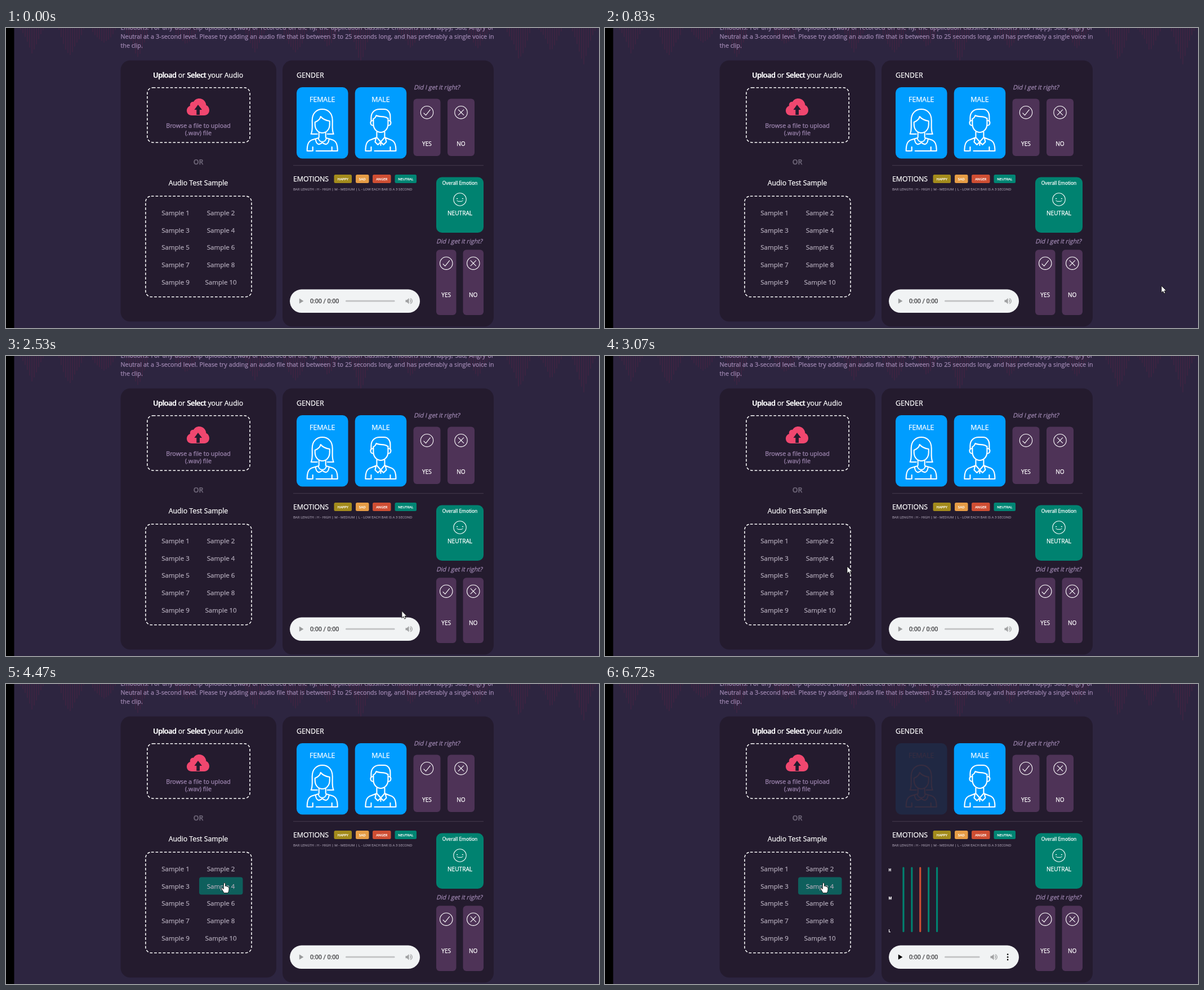
Animation, 1053 px wide and 532 px high, one loop 8 s. Source, as an HTML page with a canvas:

```html
<!DOCTYPE html>
<html lang="en">
<head>
<meta charset="utf-8">
<title>Audio emotion panel</title>
<style>
html, body { margin: 0; width: 100%; height: 100%; overflow: hidden; background: #2d2540; }
canvas { display: block; }
</style>
</head>
<body>
<canvas id="stage" width="1053" height="532"></canvas>
<script>
const W = 1053, H = 532, LOOP = 8000;
const LOADING = 4550, RESULT = 6720;
const PANEL = '#241b2e', PURPLE = '#4e3357', TEAL = '#008270', RED = '#cf4e33', LILAC = '#a189b3';
const SANS = '"Open Sans", sans-serif';

const stage = document.getElementById('stage').getContext('2d');
const layer = document.createElement('canvas');
layer.width = W;
layer.height = H;
const g = layer.getContext('2d');

const ICONS = {
  female: 'M-9 46H-20C-17 41 -18 33 -18 22C-18 9 -10 2 0 2C10 2 18 9 18 22C18 33 17 41 20 46H9' +
    'M-13 25C-8 23 -4 20 -3 15C1 20 7 22 13 23M-13 25V29C-13 38 -7 44 0 44S13 38 13 29V23' +
    'M-6 43V52M6 43V52M-19 76H-27C-27 63 -24 58 -17 56L-7 53C-6 62 6 62 7 53L17 56C24 58 27 63 27 76H-11' +
    'M-12 55C-11 64 -6 67 0 61C6 67 11 64 12 55M-17 76V69M17 76V69',
  male: 'M-17 24V17C-17 7 -10 2 -2 2H6C13 2 17 8 17 15V24M-13 24V19C-10 18 -9 16 -8 13C-1 17 6 13 12 18' +
    'M-13 20V28C-13 38 -6 43 0 43S13 38 13 28V18M-14 22C-20 22 -19 31 -13 31M14 22C20 22 19 31 13 31' +
    'M-7 42V52M7 42V52M-19 76H-27C-27 63 -24 58 -17 56L-7 52L0 60L7 52L17 56C24 58 27 63 27 76H-11' +
    'M-8 52L-10 60L-5 65L0 60L5 65L10 60L8 52M0 61V66M-17 76V69M17 76V69',
  cloud: 'M330 155C324 155 321 151 321 146.5C321 142 324 139 327 138C326 133 330 130 333 131' +
    'C335 127 339 125 343 125C350 125 355 130 355.5 137C359 138 361 142 361 146C361 151 357 155 352 155Z',
  upload: 'M341 136L348 145H344V154H338.3V145H334.5Z',
  arrow: 'M0 0V12.5L2.9 9.8L4.8 14L7 13L5.1 9H8.8Z',
  hand: 'M-1.5 1.2Q0 -1 1.5 1.2V6Q3 5 4 6.6Q6 6 6.4 7.6Q8 7.4 8 9.4V12Q8 15 6 18H-1Q-3 14 -5 11.4Q-5.6 9 -3.6 9.2L-1.5 11Z',
  speaker: 'M-6 -2H-3.5L0 -5.2V5.2L-3.5 2H-6Z'
};
for (const k in ICONS) ICONS[k] = new Path2D(ICONS[k]);

function box(x, y, x2, y2, r, color) {
  g.beginPath();
  g.roundRect(x, y, x2 - x, y2 - y, r);
  g.fillStyle = color;
  g.fill();
}

// y is the middle of the capitals; a hairline stroke gives the heavier screen weight
function text(s, x, y, size, color = '#fff', align = 'center', style = '', family = SANS) {
  g.font = `${style} ${size}px ${family}`;
  g.textAlign = align;
  g.fillStyle = g.strokeStyle = color;
  g.lineWidth = 0.25;
  g.fillText(s, x, y + size * 0.357);
  g.strokeText(s, x, y + size * 0.357);
}

function question(x, y) {
  g.save();
  g.transform(1, 0, -0.25, 1, x, y + 3.85);
  text('Did I get it right?', 0, -3.85, 10.78, LILAC, 'left');
  g.restore();
}

function justify(s, x, x2, y, size) {
  const words = s.split(' ');
  g.font = `${size}px ${SANS}`;
  const widths = words.map(w => g.measureText(w).width);
  const gap = (x2 - x - widths.reduce((a, b) => a + b)) / (words.length - 1);
  words.forEach((w, i) => {
    text(w, x, y, size, LILAC, 'left');
    x += widths[i] + gap;
  });
}

function dashed(x, y, x2, y2) {
  g.beginPath();
  g.roundRect(x, y, x2 - x, y2 - y, 10);
  g.setLineDash([4.62, 3.08]);
  g.strokeStyle = '#fff';
  g.lineWidth = 1.54;
  g.stroke();
  g.setLineDash([]);
}

function line(color, width, ...pts) {
  g.beginPath();
  for (let i = 0; i < pts.length; i += 2) g.lineTo(pts[i], pts[i + 1]);
  g.strokeStyle = color;
  g.lineWidth = width;
  g.stroke();
}

function ring(x, y, r) {
  g.beginPath();
  g.arc(x, y, r, 0, 7);
  g.strokeStyle = '#fff';
  g.lineWidth = 1.1;
  g.stroke();
}

function vote(x, x2, y, y2, iconY, textY, yes) {
  const cx = (x + x2) / 2;
  box(x, y, x2, y2, 6, PURPLE);
  ring(cx, iconY, 11.2);
  if (yes) {
    line('#fff', 1.1, cx - 6, iconY + 1, cx - 2, iconY + 5, cx + 6, iconY - 5);
  } else {
    line('#fff', 1.1, cx - 5, iconY - 5, cx + 5, iconY + 5);
    line('#fff', 1.1, cx + 5, iconY - 5, cx - 5, iconY + 5);
  }
  text(yes ? 'YES' : 'NO', cx, textY, 10.1);
}

function person(x, label, icon, off) {
  const ink = off ? '#372d40' : '#fff';
  box(x, 105, x + 91.5, 231.5, 10, off ? '#202843' : '#009dff');
  text(label, x + 45.7, 126.5, 12.32, ink);
  g.save();
  g.translate(x + 45.7, 142);
  g.strokeStyle = ink;
  g.lineWidth = 2.1;
  g.lineCap = g.lineJoin = 'round';
  g.stroke(icon);
  g.restore();
}

function chip(x, x2, label, color) {
  box(x, 260, x2, 275, 2.5, color);
  text(label, (x + x2) / 2, 267.7, 6.16);
}

function uploadPanel(hover) {
  box(203.5, 57.5, 480, 520.5, 17, PANEL);
  let x = 261;
  for (const w of ['Upload', 'or', 'Select', 'your', 'Audio']) {
    text(w, x, 83.6, 12.32, '#fff', 'left');
    if (w === 'Upload' || w === 'Select') text(w, x + 0.7, 83.6, 12.32, '#fff', 'left');
    x += g.measureText(w + ' ').width;
  }
  dashed(250.9, 105.7, 433.1, 203);
  g.fillStyle = '#f0476f';
  g.fill(ICONS.cloud);
  g.fillStyle = PANEL;
  g.fill(ICONS.upload);
  text('Browse a file to upload', 341.5, 173.5, 10.78, LILAC);
  text('(.wav) file', 341.5, 186, 10.78, LILAC);
  text('OR', 341.5, 238, 12.32, '#6f6779', 'center', '600');
  text('Audio Test Sample', 341.5, 274.6, 12.32);
  dashed(247.9, 298.3, 436, 476.7);
  g.globalAlpha = hover;
  box(343, 342.5, 420.5, 373.5, 4, '#0e5f5c');
  g.globalAlpha = 1;
  for (let i = 0; i < 10; i++) {
    text('Sample ' + (i + 1), i % 2 ? 381.5 : 301, 327.6 + 30.8 * (i >> 1), 11.55, '#b3abba');
  }
}

function player(loaded, result) {
  box(504, 463.6, 735, 505, 20.7, '#f1f3f4');
  g.fillStyle = loaded ? '#000' : '#9a9b9c';
  g.beginPath();
  g.moveTo(520.8, 479.6);
  g.lineTo(528.4, 484.2);
  g.lineTo(520.8, 488.8);
  g.fill();
  text('0:00 / 0:00', 540, 484.2, 10.78, '#3b3b3d', 'left', '', 'Roboto, sans-serif');
  box(603, 482.7, result ? 665.5 : 690.5, 485.6, 1.5, '#c1c2c4');
  g.save();
  g.translate(result ? 690.5 : 715.5, 484.2);
  g.fillStyle = '#a0a1a2';
  g.fill(ICONS.speaker);
  g.strokeStyle = '#a0a1a2';
  g.lineWidth = 1.2;
  for (const r of [2.4, 5]) {
    g.beginPath();
    g.arc(0.8, 0, r, -1.25, 1.25);
    g.stroke();
  }
  g.restore();
  if (result) for (const dy of [-4.7, 0, 4.7]) box(713.8, 482.9 + dy, 716.4, 485.5 + dy, 1.3, '#000');
}

function resultPanel(loaded, result) {
  box(491, 57.5, 866, 529.5, 17, PANEL);
  text('GENDER', 516, 83.6, 12.32, '#fff', 'left');
  person(516, 'FEMALE', ICONS.female, result);
  person(619.7, 'MALE', ICONS.male, false);
  question(724, 105.5);
  vote(723.5, 771.5, 125.5, 227, 149.7, 205.6, true);
  vote(784, 832, 125.5, 227, 149.7, 205.6, false);
  line('#453b4e', 1, 510, 243.7, 848, 243.7);

  text('EMOTIONS', 510, 267.2, 12.32, '#fff', 'left');
  chip(582.5, 614, 'HAPPY', '#a38b1c');
  chip(621, 644.5, 'SAD', '#e69c45');
  chip(651, 683.5, 'ANGER', RED);
  chip(690.5, 729, 'NEUTRAL', '#008573');
  text('BAR LENGTH : H - HIGH | M - MEDIUM | L - LOW EACH BAR IS A 3 SECOND', 510, 286.2, 6.16, '#8a8093', 'left');

  box(764, 264.5, 848, 363, 10, TEAL);
  text('Overall Emotion', 806, 275.3, 8.35);
  ring(806, 304, 11.2);
  line('#fff', 1.3, 800, 302.6, 802.2, 302.6);
  line('#fff', 1.3, 809.8, 302.6, 812, 302.6);
  line('#fff', 1, 800.5, 306, 803, 307.4, 809, 307.4, 811.5, 306);
  text('NEUTRAL', 806, 328.6, 10.1);
  question(764, 378);
  vote(764, 799.5, 393.3, 509, 417.2, 473.3, true);
  vote(811.5, 848, 393.3, 509, 417.2, 473.3, false);

  if (loaded) {
    text('H', 503.5, 330, 6.16, '#fff', 'left', 'bold');
    text('M', 503.5, 380.3, 6.16, '#fff', 'left', 'bold');
    text('L', 503.5, 438, 6.16, '#fff', 'left', 'bold');
  }
  if (result) {
    for (let i = 0; i < 5; i++) {
      const x = 528.4 + 14.9 * i;
      box(x, 324.5, x + 3.1, 440, 1.5, i === 2 ? RED : TEAL);
    }
  }
  player(loaded, result);
}

function backdrop() {
  stage.fillStyle = '#2d2540';
  stage.fillRect(0, 0, W, H);
  stage.fillStyle = '#3b2441';
  // hanging sound wave, repeated along the top edge
  const peaks = [[45, 46], [115, 74], [172, 44], [231, 66], [318, 48]];
  for (let x = 17; x < W; x += 4) {
    const u = x % 397;
    let h = 0;
    for (const [c, a] of peaks) h = Math.max(h, a * (1 - Math.abs(u - c) / 23));
    h *= 0.8 + 0.2 * Math.sin(x * 1.7);
    if (h > 2) stage.fillRect(x, 0, 2, h);
  }
  stage.fillStyle = '#000';
  stage.fillRect(0, 0, 14.5, H);
}

// start, end, steps, then a quadratic curve
const MOVES = [
  [430, 830, 6, 1075, 545, 870, 490, 988, 457],
  [1210, 1430, 4, 988, 457, 980, 447, 973, 433],
  [2210, 2680, 7, 973, 433, 790, 545, 590, 381],
  [2910, 3070, 3, 590, 381, 510, 375, 430, 373],
  [3310, 3450, 3, 430, 373, 412, 364, 395, 357],
  [3850, 4230, 6, 395, 357, 391, 354, 388, 352.5]
];
const CLICKS = [[1660, 1830], [4230, 4390]];

function progress([start, end, n], t) {
  if (t < start) return 0;
  return Math.min(n, Math.floor((t - start) / (end - start) * (n - 1) + 1e-6) + 1) / n;
}

function pointer(t) {
  const move = MOVES.filter(m => t >= m[0]).pop();
  if (!move) return;
  const u = progress(move, t), v = 1 - u;
  const at = i => v * v * move[i] + 2 * u * v * move[i + 2] + u * u * move[i + 4];
  const x = at(3), y = at(4);
  const shape = x < 420 ? ICONS.hand : ICONS.arrow;
  stage.save();
  stage.translate(x, y);
  if (CLICKS.some(([a, b]) => t >= a && t < b)) {
    stage.fillStyle = 'rgba(255,255,0,.47)';
    stage.beginPath();
    stage.arc(0, 0, 9.5, 0, 7);
    stage.fill();
  }
  stage.lineWidth = 0.9;
  stage.strokeStyle = '#111';
  stage.fillStyle = '#fff';
  stage.fill(shape);
  stage.stroke(shape);
  stage.restore();
}

function draw(t) {
  const loaded = t >= LOADING, result = t >= RESULT;
  g.clearRect(0, 0, W, H);
  justify('Emotions. For any audio clip uploaded (.wav) or recorded on the fly, the application classifies emotions into Happy, Sad, Angry or', 203.5, 866.5, -0.8, 10.78);
  justify('Neutral at a 3-second level. Please try adding an audio file that is between 3 to 25 seconds long, and has preferably a single voice in', 203.5, 866.5, 15.4, 10.78);
  text('the clip.', 203.5, 31.5, 10.78, LILAC, 'left');
  uploadPanel(progress(MOVES[4], t));
  resultPanel(loaded, result);

  backdrop();
  stage.filter = loaded && !result ? 'grayscale(0.7)' : 'none';
  stage.drawImage(layer, 0, 0);
  stage.filter = 'none';
  pointer(t);
}

const begin = performance.now();
function frame() {
  draw((performance.now() - begin) % LOOP);
  requestAnimationFrame(frame);
}
frame();
</script>
</body>
</html>
```
